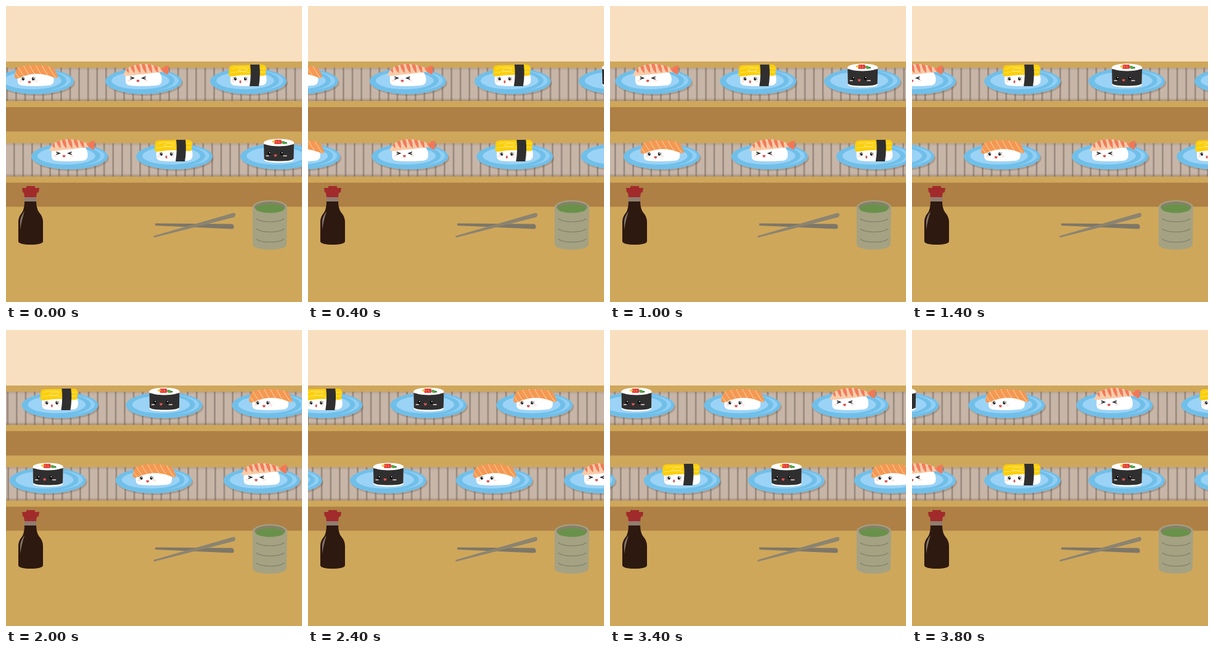
Recreate the animation shown at these times as an HTML page with a canvas. Size 480 px wide and 480 px high, loop 4000 ms.

```html
<!DOCTYPE html>
<html lang="en">
<head>
<meta charset="utf-8">
<title>Sushi belt</title>
<style>
html, body { margin: 0; width: 100%; height: 100%; overflow: hidden; background: #cfa75b; }
canvas { display: block; width: 480px; height: 480px; }
</style>
</head>
<body>
<canvas id="stage" width="480" height="480"></canvas>
<script>
const c = document.getElementById('stage').getContext('2d');
const LOOP = 4000, STEP = 200;
const PERIOD = 686, SLAT = PERIOD / 47;
const GOLD = '#cfa75b', BROWN = '#ae8045', INK = '#222';

function rect(x, y, w, h, color) {
  c.fillStyle = color;
  c.fillRect(x, y, w, h);
}
function oval(x, y, rx, ry, color, turn = 0) {
  c.fillStyle = color;
  c.beginPath();
  c.ellipse(x, y, rx, ry, turn, 0, Math.PI * 2);
  c.fill();
}
function round(x, y, w, h, r, color) {
  c.fillStyle = color;
  c.beginPath();
  c.roundRect(x, y, w, h, r);
  c.fill();
}
function shape(d, color) {
  c.fillStyle = color;
  c.fill(new Path2D(d));
}
function line(d, color, width) {
  c.strokeStyle = color;
  c.lineWidth = width;
  c.lineCap = 'round';
  c.stroke(new Path2D(d));
}
function clipTo(d, draw) {
  c.save();
  c.clip(new Path2D(d));
  draw();
  c.restore();
}
function shade(y, from, to) {
  const g = c.createLinearGradient(0, y, 0, y + 5);
  g.addColorStop(0, `rgba(110,82,60,${from})`);
  g.addColorStop(1, `rgba(110,82,60,${to})`);
  rect(0, y, 480, 5, g);
}

function plate() {
  oval(2, 3, 62, 20.5, 'rgba(85,60,45,.22)');
  oval(0, 0, 62, 21, '#70bfe9');
  oval(1, -1, 56, 17, '#91cff5');
  oval(-5, -1, 55, 18, '#70bfe9');
  oval(-5, -1, 47, 14, '#9bd3f6');
}

function rice() {
  shape('M-27 -14 Q0 -19 26 -14 Q31 -7 29 2 Q27 7 19 7 Q-2 9 -22 7 Q-29 6 -29 0 Q-30 -9 -27 -14Z', '#fff');
}

function eyes(a, b, y) {
  for (const [x, side] of [[a, -1], [b, 1]]) {
    oval(x, y, 2, 2.8, INK);
    oval(x + .6, y - 1.1, .8, .9, '#fff');
    line(`M${x + side * 2} ${y - 1} l${side * 1.8} -.8 M${x + side * 2} ${y + 1} l${side * 1.8} 0`, INK, .5);
  }
}
function smile(x, y) {
  shape(`M${x - 2.5} ${y - 1} Q${x} ${y - 2} ${x + 2.5} ${y - 1} Q${x + 2} ${y + 2.5} ${x} ${y + 2.5} Q${x - 2} ${y + 2.5} ${x - 2.5} ${y - 1}Z`, '#dd5350');
}
function cheeks(a, b, y) {
  oval(a, y, 3, 1.4, '#fde3dd');
  oval(b, y, 3, 1.4, '#fde3dd');
}

function salmon() {
  rice();
  const top = 'M-34 -6 Q-35 -17 -27 -23 Q-15 -27 5 -26 Q23 -26 30 -20 Q35 -13 36 -6 Q32 -4 27 -7 Q9 -14 -9 -11 Q-20 -9 -27 -5 Q-32 -3 -34 -6Z';
  shape(top, '#f49852');
  clipTo(top, () => {
    for (let x = -40; x < 40; x += 10)
      line(`M${x} -27 Q${x + 4} -17 ${x + 13} -6`, '#fbc48f', 1.2);
  });
  cheeks(-24, 1, 0);
  eyes(-20, -4, -4);
  smile(-10, 1);
}

function shrimp() {
  rice();
  shape('M27 -19 L32 -22 Q35 -26 42 -25 Q39 -21 40 -19 Q42 -14 39 -11 Q34 -13 31 -16 L27 -14Z', '#f47755');
  const top = 'M-33 -10 Q-30 -18 -23 -23 Q-13 -28 2 -28 Q18 -27 30 -21 L31 -15 Q16 -14 6 -12 Q-10 -11 -23 -9 Q-32 -8 -33 -10Z';
  shape(top, '#f9cba9');
  clipTo(top, () => {
    for (let x = -32; x < 30; x += 9.5)
      shape(`M${x} -29 L${x + 5} -29 Q${x + 9} -21 ${x + 8} -13 Q${x + 2} -18 ${x} -29Z`, '#f17c59');
  });
  cheeks(-23, 4, -1);
  line('M-21 -7 L-16 -5 L-21 -3.5 M3 -7 L-2 -5 L3 -3.5', INK, 1.4);
  smile(-9, -1);
}

function tamago() {
  rice();
  shape('M-32 -12 L-31 -22 Q-30 -26 -24 -26 L23 -27 Q29 -26 29 -21 L28 -10 Q25 -8 20 -9 Q-3 -12 -25 -8 Q-32 -7 -32 -12Z', '#fbcf0b');
  line('M-29 -14 Q-6 -17 2 -14 M-27 -20 Q-18 -25 1 -22 M-16 -17 Q-19 -21 -7 -21 Q3 -20 -3 -17 Q-10 -15 -16 -17 M19 -21 L27 -21 M19 -15 L27 -15', '#fde66e', 1);
  shape('M3 -27 L18 -27 Q20 -10 17 8 L2 8 Q5 -10 3 -27Z', '#302f2f');
  cheeks(-25, -3, 0);
  eyes(-21, -5, -4);
  oval(-13, 1, 1.5, 2.4, '#dd5350');
}

function maki() {
  shape('M-24 -22 L-23.5 6 Q-20 10 1 10 Q22 10 24.5 6 L25 -22Z', '#fff');
  shape('M-24 -20 Q0 -14 25 -20 L24.5 4 Q20 7.5 1 7.5 Q-20 7.5 -23.5 4Z', '#302f2f');
  oval(.5, -22.5, 24.5, 6, '#fff');
  round(-7, -27, 12, 7, 2, '#e43c38');
  line('M-4 -26 L-3 -21 M0 -26 L1 -21', '#f47c5b', 1);
  oval(-8, -24, 2.6, 1.8, '#f6c526');
  oval(8, -22.5, 3.2, 2.4, '#58a545', .4);
  oval(12, -22, 2, 1.6, '#3a8538');
  for (const x of [-15, 5]) {
    oval(x, -5, 2.2, 2.8, '#090909');
    oval(x + .6, -6, .8, .9, '#fff');
  }
  line('M-20 -1 L-16 -1 M8 -1 L13 -1', '#f6dcd7', 1.4);
  smile(-5, -2);
}

const menu = [[salmon, 0], [shrimp, 175], [tamago, 345], [maki, 514]];

function belt(top, height, y, shift) {
  rect(0, top, 480, height, '#c7b6a8');
  const first = ((shift + 12.2) % SLAT + SLAT) % SLAT - SLAT;
  for (let x = first; x < 490; x += SLAT) rect(x - 1.4, top, 2.8, height, '#9c8c80');
  shade(top, .2, 0);
  shade(top + height - 5, 0, .4);
  for (const [dish, gap] of menu) {
    let x = (shift + gap) % PERIOD;
    if (x < -70) x += PERIOD;
    if (x > PERIOD - 70) x -= PERIOD;
    c.save();
    c.translate(x, y);
    plate();
    dish();
    c.restore();
  }
}

function bottle() {
  shape('M30 316 L49 316 Q49 329 54 335 Q60 342 60 350 L60 382 Q58 387 40 387 Q22 387 20 382 L20 350 Q20 342 26 335 Q30 329 30 316Z', '#2d190f');
  rect(30, 309, 19, 8, '#917c70');
  shape('M33 292 L47 292 L47 295 L54 295 L53 302 L50 303 L49 310 L30 310 L29 303 L27 302 L26 295 L33 295Z', '#a12b2b');
  shape('M30 333 Q23 342 23 350 L23 363 Q25 349 30 333Z', '#85776b');
}

function chopsticks() {
  shape('M242 352.5 L367 353.5 Q371 356 369 361 L365 361.5 L242 356Z', '#7e7767');
  shape('M239 373 L367 336 Q372 334 372 339 Q372 342 368 343 L240 375.5Z', '#8c8470');
}

function cup() {
  shape('M400 326 L456 326 L455 387 Q452 395 428 395 Q403 395 400 387Z', '#a4a282');
  oval(428, 326, 28, 11, '#a4a282');
  oval(428, 326, 25, 9, '#858269');
  oval(428, 328.5, 23, 7, '#69914a');
  for (const y of [345, 361.5, 378])
    line(`M406 ${y} Q413 ${y + 5} 428 ${y + 5} Q444 ${y + 5} 451 ${y}`, '#7f7d68', 1.2);
}

function draw(t) {
  const s = t / 1000;
  rect(0, 0, 480, 480, GOLD);
  rect(0, 0, 480, 90, '#f8dfbf');
  rect(0, 164, 480, 39.5, BROWN);
  rect(0, 286.5, 480, 39, BROWN);
  belt(100, 54, 122, 48 - 152.8 * s);
  belt(222.5, 54, 244, -72 + 155.8 * s);
  bottle();
  chopsticks();
  cup();
}

function tick(now) {
  draw(Math.floor((now % LOOP) / STEP) * STEP);
  requestAnimationFrame(tick);
}
draw(0);
requestAnimationFrame(tick);
</script>
</body>
</html>
```
